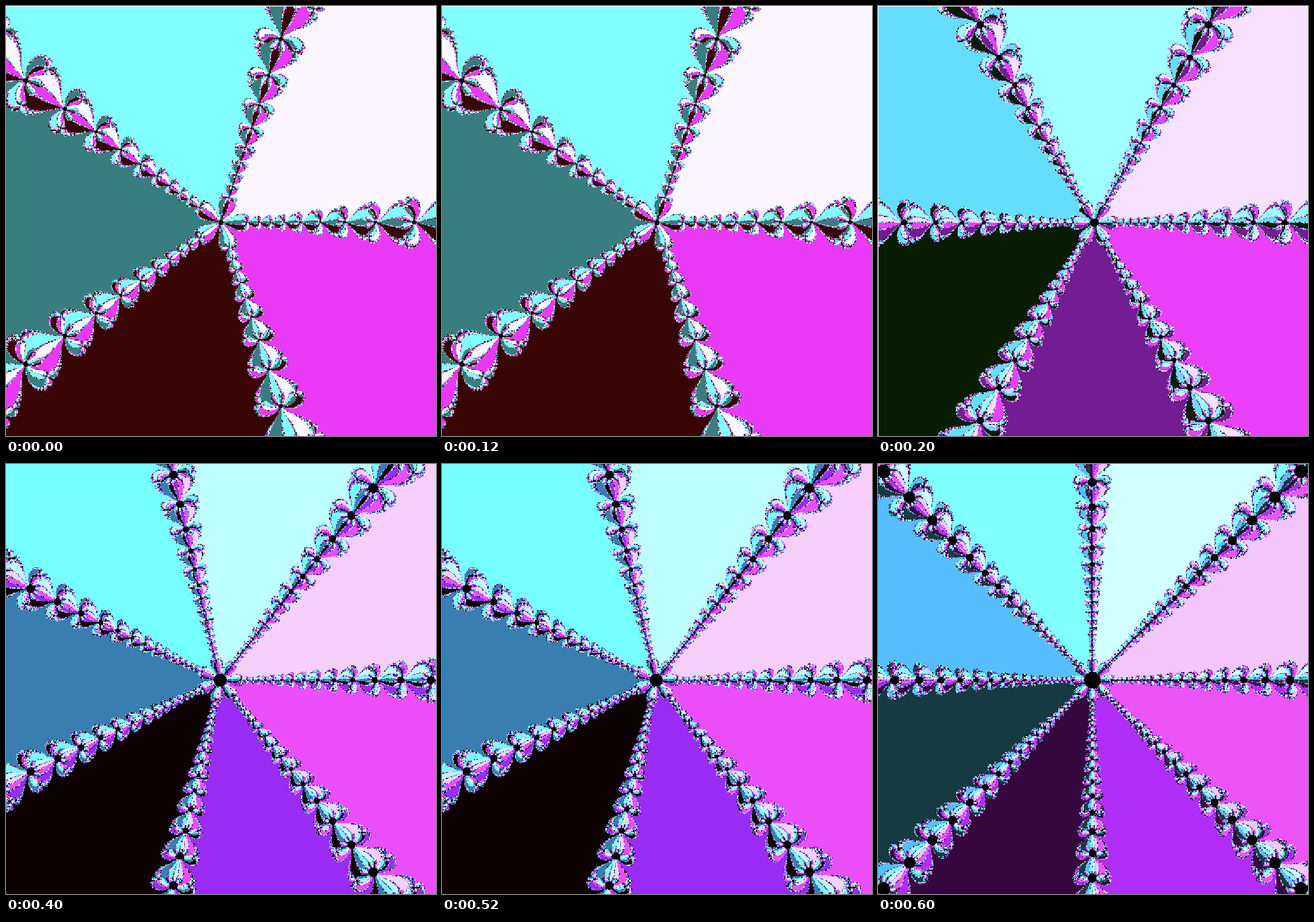
Recreate the animation shown at these times as an HTML page with a canvas. Size 748x748 px, loop 800 ms.

```html
<!DOCTYPE html>
<html lang="en">
<head>
<meta charset="utf-8">
<title>Newton basins of zⁿ + 1</title>
<style>
  html, body { margin: 0; width: 100%; height: 100%; overflow: hidden; background: #000; }
  canvas { display: block; width: 100vw; height: 100vh; image-rendering: pixelated; }
</style>
</head>
<body>
<canvas id="stage" width="748" height="748"></canvas>
<script>
const SIZE = 748, GRID = 500, CELL = SIZE / GRID, HOLD = 200, MAX_STEPS = 90;

// One scene per degree: centre and unit in pixels, radius of the central dot,
// basin colours counter-clockwise from the positive real axis.
const scenes = [
  { cx: 374, cy: 376.5, unit: 59.7, dot: 4.9, edge: [0, 1],
    colors: ['fcf6ff', '82ffff', '387e80', '380404', 'ea3af8'] },
  { cx: 376.5, cy: 376.8, unit: 47.47, dot: 7.8, edge: [1, 1],
    colors: ['f8e0ff', 'a0ffff', '64defc', '081c04', '741c92', 'ea40fa'] },
  { cx: 372.6, cy: 376, unit: 44.98, dot: 11.5, edge: [0, 0],
    colors: ['f6d0fa', 'beffff', '76ffff', '387eb0', '0c0000', '9a2cf6', 'ec4efa'] },
  { cx: 372.8, cy: 376, unit: 43.07, dot: 14.8, edge: [0, 0],
    colors: ['f4c6fc', 'd0ffff', '80ffff', '56befc', '163a42', '36063e', 'b02ef8', 'ec54f8'] }
];

// Index of the root reached from x + iy, or -1 near the pole.
function basin(x, y, n, hole) {
  for (let step = 0; step < MAX_STEPS; step++) {
    if (x * x + y * y < hole) return -1;
    let u = x, v = y;
    for (let k = 1; k < n; k++) {
      const t = u * x - v * y;
      v = u * y + v * x;
      u = t;
    }
    if ((u + 1) ** 2 + v * v < 0.01) {
      const turn = Math.atan2(y, x) / (2 * Math.PI);
      return Math.floor((turn + 1) % 1 * n);
    }
    const m = u * u + v * v;
    const a = (n - 1 - u / m) / n, b = v / m / n;
    const next = x * a - y * b;
    y = x * b + y * a;
    x = next;
  }
  return -1;
}

function render({ cx, cy, unit, dot, edge, colors }) {
  const small = document.createElement('canvas');
  small.width = small.height = GRID;
  const g = small.getContext('2d');
  const image = g.createImageData(GRID, GRID);
  const pixels = new Uint32Array(image.data.buffer);
  const inks = colors.map(hex => {
    const c = parseInt(hex, 16);
    return (0xff000000 | (c & 255) << 16 | c & 0xff00 | c >> 16) >>> 0;
  });
  const hole = (dot / unit) ** 2;
  for (let j = 0; j < GRID; j++) {
    for (let i = 0; i < GRID; i++) {
      const x = ((i + 0.5) * CELL - cx) / unit;
      const y = (cy - (j + 0.5) * CELL) / unit;
      const root = basin(x, y, colors.length, hole);
      pixels[j * GRID + i] = root < 0 ? 0xff000000 : inks[root];
    }
  }
  g.putImageData(image, 0, 0);

  const full = document.createElement('canvas');
  full.width = full.height = SIZE;
  const f = full.getContext('2d');
  f.imageSmoothingEnabled = false;
  f.drawImage(small, 0, 0, SIZE, SIZE);
  f.fillStyle = '#fff';
  f.fillRect(0, 0, edge[0], SIZE);
  f.fillRect(0, 0, SIZE, edge[1]);
  return full;
}

const pen = document.getElementById('stage').getContext('2d');
const views = scenes.map(render);
let start = null, shown = -1;

function draw(now) {
  if (start === null) start = now;
  const k = Math.floor(Math.max(0, now - start) / HOLD) % views.length;
  if (k !== shown) pen.drawImage(views[shown = k], 0, 0);
  requestAnimationFrame(draw);
}
pen.drawImage(views[0], 0, 0);
requestAnimationFrame(draw);
</script>
</body>
</html>
```
